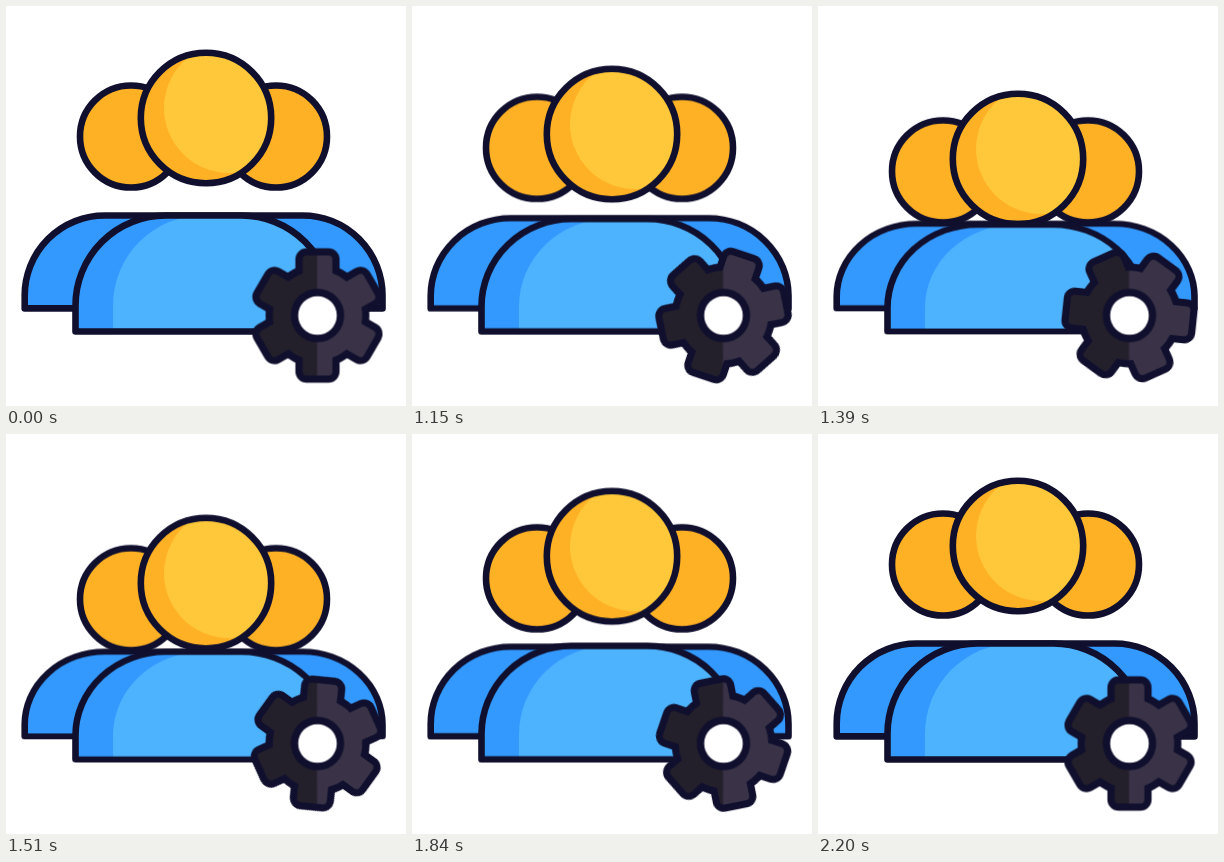
These frames come from a looping animation (400x400 px, 2230 ms). An HTML page without scripts:

```html
<!DOCTYPE html>
<html lang="en">
<head>
<meta charset="utf-8">
<title>Group settings</title>
<style>
  html, body { margin: 0; width: 100%; height: 100%; overflow: hidden; background: #fff; }
  svg { display: block; width: 100%; height: 100%; }

  .line { fill: none; stroke: #10102e; stroke-width: 6.6; stroke-linejoin: round; }
  .amber { fill: #ffb125; }
  .gold { fill: #ffc73a; }
  .blue { fill: #3399ff; }
  .sky { fill: #4db3ff; }

  .front, .back, .spin, .unspin { animation: 2230ms linear infinite; }
  .front { animation-name: press-front; }
  .back { animation-name: press-back; }
  .spin { --turn: 180deg; animation-name: turn; }
  .unspin { --turn: -180deg; animation-name: turn; }

  .front.head { --drop: 41px; }
  .back.head { --drop: 35.5px; }
  .front.body { --squash: .92; transform-origin: 0 325px; }
  .back.body { --squash: .91; transform-origin: 0 302px; }

  @keyframes press-front {
    0% { transform: none; }
    44.6% { transform: none; animation-timing-function: cubic-bezier(.33, 0, .6, 1); }
    61.9% {
      transform: translateY(var(--drop, 0px)) scaleY(var(--squash, 1));
      animation-timing-function: cubic-bezier(.31, 0, .43, 1);
    }
    98.6%, 100% { transform: none; }
  }
  @keyframes press-back {
    0% { transform: none; }
    44.6% { transform: none; animation-timing-function: cubic-bezier(.33, 0, .6, 1); }
    64.2% {
      transform: translateY(var(--drop, 0px)) scaleY(var(--squash, 1));
      animation-timing-function: cubic-bezier(.4, 0, .52, 1);
    }
    98.6%, 100% { transform: none; }
  }
  @keyframes turn {
    0% { transform: rotate(0deg); }
    44.6% { transform: rotate(0deg); animation-timing-function: cubic-bezier(.26, 0, .24, 1); }
    98.6%, 100% { transform: rotate(var(--turn)); }
  }
</style>
</head>
<body>
<svg viewBox="0 0 400 400">
  <defs>
    <circle id="face" cx="200" cy="112" r="65.2"/>
    <path id="torso" d="M69.5 325.5V299.5a90 90 0 0 1 90-90H235.5a90 90 0 0 1 90 90V325.5Z"/>
    <rect id="bar" x="-14.9" y="-60" width="29.8" height="120" rx="4"/>
    <circle id="hub" r="44.7"/>
    <clipPath id="face-clip"><use href="#face"/></clipPath>
    <clipPath id="torso-clip"><use href="#torso"/></clipPath>
    <clipPath id="gear-clip">
      <use href="#hub"/>
      <use href="#bar"/>
      <use href="#bar" transform="rotate(60)"/>
      <use href="#bar" transform="rotate(120)"/>
    </clipPath>
  </defs>

  <g class="back head">
    <circle class="line amber" cx="125" cy="130.5" r="51"/>
    <circle class="line amber" cx="270" cy="130.5" r="51"/>
  </g>
  <g class="front head">
    <use href="#face" class="amber"/>
    <circle class="gold" cx="223" cy="102" r="65" clip-path="url(#face-clip)"/>
    <use href="#face" class="line"/>
  </g>

  <path class="back body line blue" d="M18.7 302.4V289.5a80 80 0 0 1 80-80H296.5a80 80 0 0 1 80 80V302.4Z"/>
  <g class="front body">
    <use href="#torso" class="blue"/>
    <path class="sky" d="M107 326V299.5a90 90 0 0 1 90-90H330V326Z" clip-path="url(#torso-clip)"/>
    <use href="#torso" class="line"/>
  </g>

  <g transform="translate(311.5 309.5)">
    <g class="spin">
      <g fill="#10102e" stroke="#10102e" stroke-width="14.4" stroke-linejoin="round">
        <use href="#hub"/>
        <use href="#bar"/>
        <use href="#bar" transform="rotate(60)"/>
        <use href="#bar" transform="rotate(120)"/>
      </g>
      <!-- shading stays upright while the outline turns -->
      <g clip-path="url(#gear-clip)">
        <g class="unspin">
          <rect x="-70" y="-70" width="140" height="140" fill="#3a3347"/>
          <rect x="-70" y="-70" width="69.5" height="140" fill="#231f2b"/>
        </g>
      </g>
    </g>
    <circle class="line" r="23" style="fill: #fff; stroke-width: 7.4"/>
  </g>
</svg>
</body>
</html>
```
